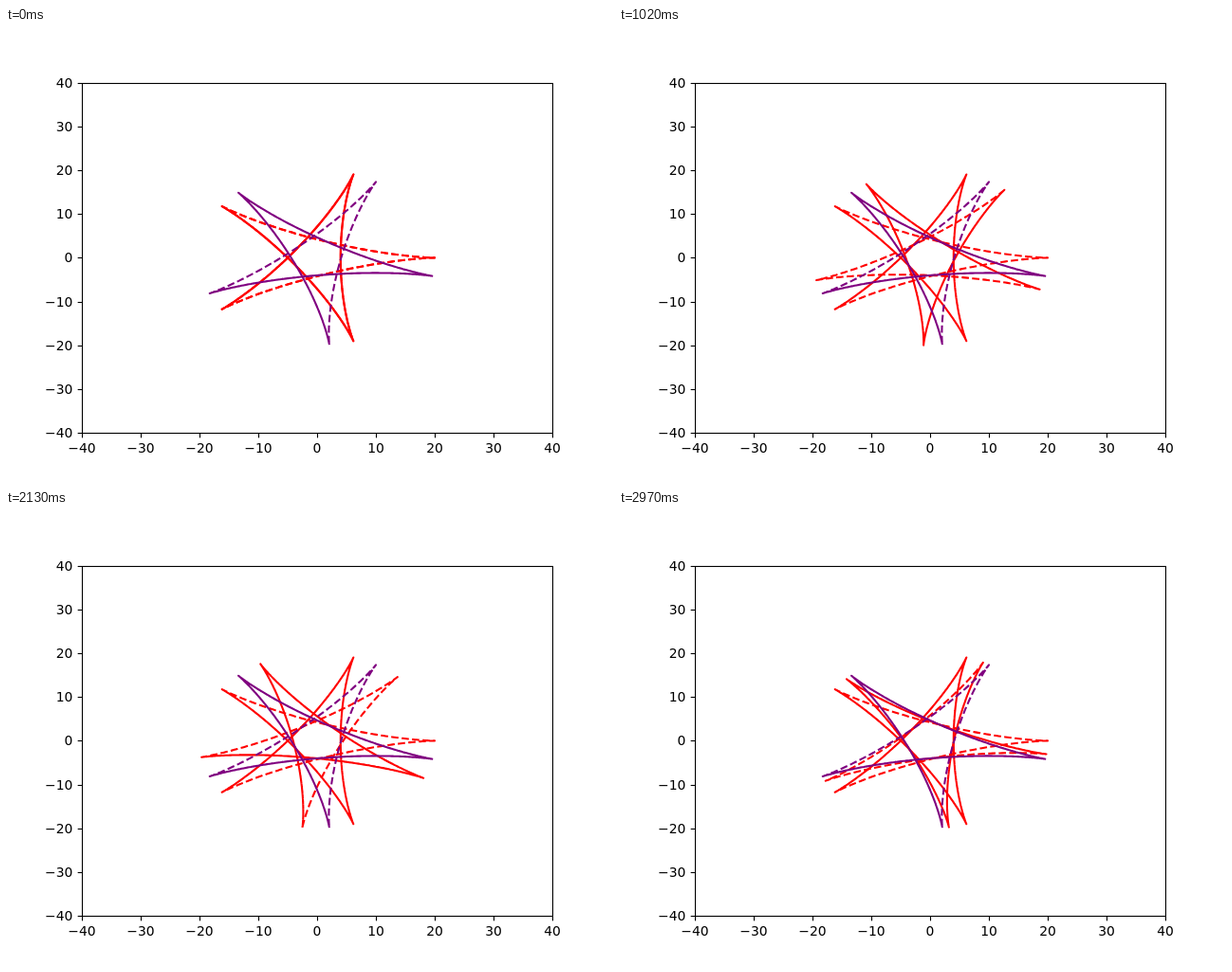
Recreate the animation shown at these times as an HTML page with a canvas. Size 640 by 480 pixels, loop 3000 ms.

```html
<!DOCTYPE html>
<html lang="en">
<head>
<meta charset="utf-8">
<title>Rotating hypocycloids</title>
<style>
  html, body { margin: 0; width: 100%; height: 100%; overflow: hidden; background: #fff; }
  canvas { display: block; }
</style>
</head>
<body>
<canvas id="stage" width="640" height="480"></canvas>
<script>
const ctx = document.getElementById('stage').getContext('2d');
const PT = 100 / 72; // points to pixels
const STEP_MS = 30, STEPS = 100;
const toX = x => 328 + 6.2 * x;
const toY = y => 242.4 - 4.62 * y;
const snap = v => Math.floor(v + 0.5) + 0.5;

function segment(x1, y1, x2, y2) {
  ctx.beginPath();
  ctx.moveTo(x1, y1);
  ctx.lineTo(x2, y2);
  ctx.stroke();
}

function drawAxes() {
  const left = snap(toX(-40)), right = snap(toX(40));
  const top = snap(toY(40)), bottom = snap(toY(-40));
  const tick = 3.5 * PT;
  ctx.setLineDash([]);
  ctx.lineWidth = 0.8 * PT;
  ctx.lineJoin = 'miter';
  ctx.strokeStyle = ctx.fillStyle = '#000';
  ctx.font = `${10 * PT}px "DejaVu Sans", sans-serif`;
  ctx.strokeRect(left, top, right - left, bottom - top);
  for (let v = -40; v <= 40; v += 10) {
    const label = String(v).replace('-', '\u2212');
    const x = snap(toX(v)), y = snap(toY(v));
    segment(x, bottom, x, bottom + tick);
    segment(left, y, left - tick, y);
    ctx.textAlign = 'center';
    ctx.fillText(label, toX(v), 448);
    ctx.textAlign = 'right';
    ctx.fillText(label, 70.3, y + 4.5);
  }
}

// Five-cusped hypocycloid; overlapping passes of dashes fill in some arcs.
function drawStar(angle, color) {
  const c = Math.cos(angle), s = Math.sin(angle);
  ctx.beginPath();
  for (let i = 0; i <= 1000; i++) {
    const t = -10 + i / 50;
    const x = 12 * Math.cos(t) + 8 * Math.cos(1.5 * t);
    const y = 12 * Math.sin(t) - 8 * Math.sin(1.5 * t);
    ctx.lineTo(toX(x * c - y * s), toY(x * s + y * c));
  }
  ctx.setLineDash([5.55 * PT, 2.4 * PT]);
  ctx.lineWidth = 1.5 * PT;
  ctx.lineJoin = 'round';
  ctx.strokeStyle = color;
  ctx.stroke();
}

function draw(now) {
  const step = Math.floor(now / STEP_MS) % STEPS;
  ctx.fillStyle = '#fff';
  ctx.fillRect(0, 0, 640, 480);
  drawStar(0, 'red');
  drawStar(step * 0.1, 'red');
  drawStar(Math.PI / 3, 'purple');
  drawAxes();
}

let start;
function loop(now) {
  start ??= now;
  draw(now - start);
  requestAnimationFrame(loop);
}
draw(0);
requestAnimationFrame(loop);
</script>
</body>
</html>
```
